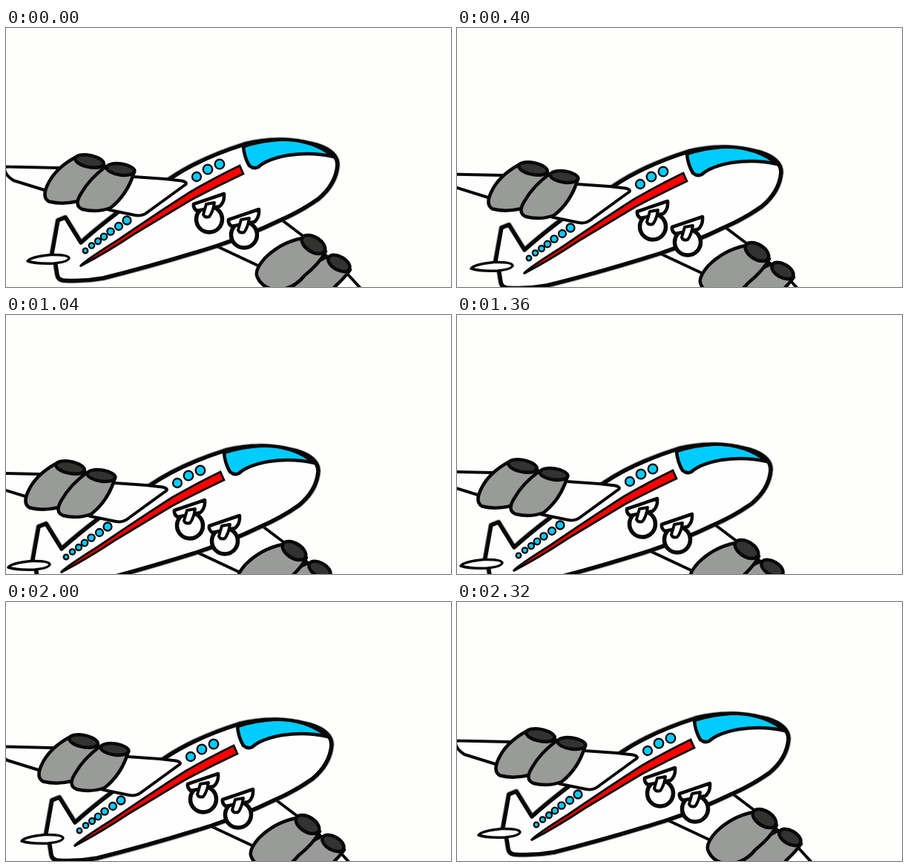
An HTML page that plays this animation: 600x350 px, repeating every 2.36 s.

```html
<!DOCTYPE html>
<html lang="en">
<head>
<meta charset="utf-8">
<title>Airplane</title>
<style>
  html, body { margin: 0; width: 100%; height: 100%; overflow: hidden; background: #fefefc; }
  svg { display: block; width: 600px; height: 350px; }
  .line { fill: none; stroke: #080808; stroke-linejoin: round; stroke-linecap: round; }
  .skin { fill: #fefefe; }
  .engine { fill: #999b98; stroke-width: 4.5; }
  .mouth { fill: #323331; stroke-width: 4.5; }
  .glass { fill: #00ccff; }
  .stripe { fill: #f00; stroke-linejoin: miter; }
  .halo { stroke: #444; stroke-opacity: .5; }
</style>
</head>
<body>
<svg viewBox="0 0 600 350">
  <defs>
    <g id="gear">
      <circle class="line skin" cx="274" cy="258.500" r="17.5" stroke-width="5.500"/>
      <path class="line skin" stroke-width="4.500" d="M253 238 L294 224 Q295 235 288 241 L257 247 Q252 243 253 238Z"/>
      <path class="line skin" stroke-width="4" d="M270 238 L281 236 Q279 249 274 255 Q268 257 266 252Z"/>
    </g>
    <path id="hull" d="M70 260 L80 256 L101 290 Q122 271 151 249 L222 203 Q262 176 322 157 Q370 145 418 158 Q447 167 447 185 Q445 211 421 231 Q397 248 369 260 Q330 279 284 294.500 Q200 321 131 338 Q104 343 77 341 Q70 340 69 333 L66 314 L62 305Z"/>
  </defs>
  <g id="plane">
    <!-- near wing -->
    <path class="line skin" stroke-width="4" d="M278 292 L345 323.500 L420 400 L522 400 L461 333 L403 283 L366 255Z"/>
    <path class="line engine" d="M433 309 Q408 320 390 342 Q380 362 400 372 Q430 370 444 349 Q456 338 464 327Z"/>
    <ellipse class="line mouth" rx="16" ry="9" transform="translate(449 318) rotate(30)"/>
    <path class="line engine" d="M399 284 Q370 290 349 311 Q334 328 339 337 Q346 352 365 354 Q388 353 402 335 Q423 318 431 302Z"/>
    <ellipse class="line mouth" rx="17.5" ry="10" transform="translate(414.500 292.500) rotate(32)"/>

    <!-- hull and tail -->
    <use href="#hull" class="line halo" stroke-width="7.500"/>
    <use href="#hull" class="line skin" stroke-width="5.500"/>
    <path class="line skin" stroke-width="3.500" d="M29 315 Q34 309 60 306.500 Q84 306 85 311 Q84 316 65 318 Q40 319 29 315Z"/>
    <path class="line glass" stroke-width="4.500" d="M320 160 Q345 152 372 150.500 Q415 151 442 174 Q412 167 380 172 Q352 177 340 188 Q334 191 328 186 Q321 174 320 160Z"/>
    <path class="line stripe" stroke-width="2.800" d="M100 322 Q104 316 150 287 Q204 250 250 220.500 Q284 201 315 186 L320 197 Q284 214 250 232 Q210 256 172 279 Q136 303 100 322Z"/>
    <g id="ports"></g>
    <use href="#gear"/>
    <use href="#gear" x="47" y="21"/>

    <!-- far wing -->
    <path class="line skin" stroke-width="4" d="M-2 191 Q-2 187 4 187.500 L70 189 L172 201 L215 204 L237 206.500 Q247 209 240 213 L192 248 Q184 255 174 253 L140 246 L55 220 L10 206 Q-1 199 -2 191Z"/>
    <path class="line engine" d="M93 175 Q66 190 56 212 Q48 229 58 234.500 Q76 239 97 234 Q110 222 119 206 Q129 196 132 184Z"/>
    <ellipse class="line mouth" rx="19.500" ry="8" transform="translate(112.500 180) rotate(11)"/>
    <path class="line engine" d="M135 187 Q112 204 101 224 Q91 240 103 245 Q122 250 141 243 Q164 225 173 194Z"/>
    <ellipse class="line mouth" rx="19" ry="7.500" transform="translate(154.500 191) rotate(8)"/>
  </g>
</svg>
<script>
  const STEP = 40, COUNT = 59, TURN = 29;
  const plane = document.getElementById('plane');
  const ports = [
    [288, 184, 6.3], [272, 191, 6.3], [257, 201, 6],
    [163, 260, 5.5], [152, 268, 5], [141, 275, 4.7], [132, 282, 4.3],
    [124, 288, 4], [115.5, 294, 3.7], [107, 301, 3.3]
  ];
  document.getElementById('ports').innerHTML = ports.map(([x, y, r]) =>
    `<circle class="line glass" cx="${x}" cy="${y}" r="${r}" stroke-width="2.3"/>`).join('');

  // The plane sinks back one pixel per step, then climbs again.
  function draw(time) {
    const i = Math.floor(time / STEP) % COUNT;
    const d = TURN - Math.abs(i - TURN);
    plane.setAttribute('transform', `translate(${-d} ${d})`);
  }

  const start = performance.now();
  function tick() {
    draw(performance.now() - start);
    requestAnimationFrame(tick);
  }
  tick();
</script>
</body>
</html>
```
